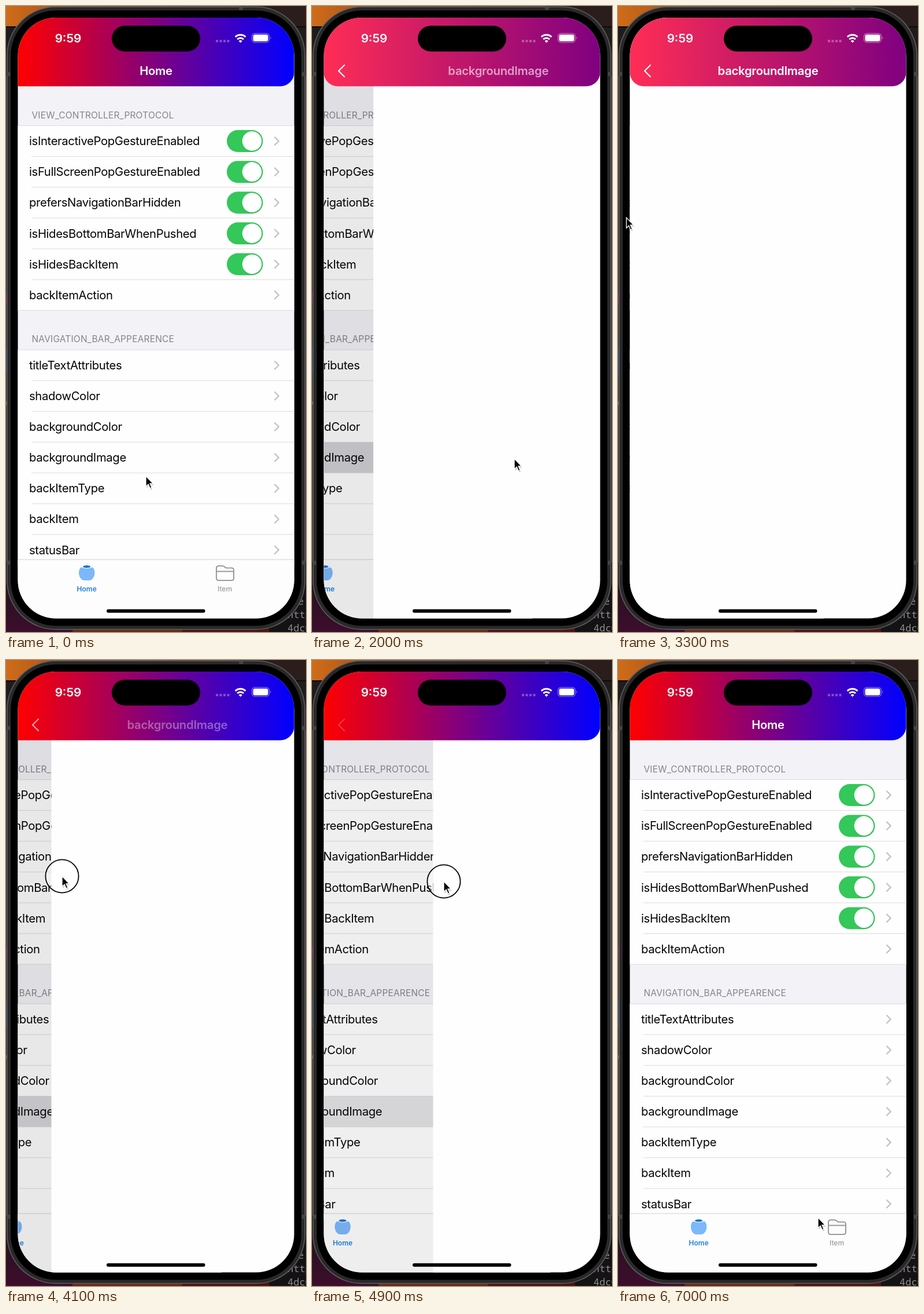
An HTML page for the animation above (7.1 s loop, 519 by 1080 pixels).

```html
<!DOCTYPE html>
<html lang="en">
<head>
<meta charset="utf-8">
<title>Navigation bar demo</title>
<style>
  html, body { margin: 0; width: 100%; height: 100%; overflow: hidden; background: #1c1618; }
  svg { display: block; width: 100vw; height: 100vh; }
  text { font-family: Inter, "Noto Sans", sans-serif; white-space: pre; }
  .row { font-size: 20.3px; letter-spacing: -.37px; fill: #050505; }
  .head { font-size: 15.5px; letter-spacing: .18px; fill: #85858a; }
  .title { font-size: 20.3px; letter-spacing: -.26px; font-weight: 600; fill: #fff; text-anchor: middle; }
  .clock { font-size: 20.7px; font-weight: 600; fill: #fff; text-anchor: middle; }
  .tab { font-size: 12px; font-weight: 500; text-anchor: middle; }
  .term { font: 17px "Noto Sans Mono", "DejaVu Sans Mono", monospace; fill: #8d8d8d; }
</style>
</head>
<body>
<svg viewBox="0 0 519 1080" preserveAspectRatio="none">
  <defs>
    <linearGradient id="homeFill" gradientUnits="userSpaceOnUse" x1="20" x2="498">
      <stop stop-color="#f00"/><stop offset="1" stop-color="#00f"/>
    </linearGradient>
    <linearGradient id="pageFill" gradientUnits="userSpaceOnUse" x1="20" x2="498">
      <stop stop-color="#ff2d55"/><stop offset="1" stop-color="#800080"/>
    </linearGradient>
    <linearGradient id="sky">
      <stop stop-color="#cf6c1a"/><stop offset=".3" stop-color="#a24d16"/><stop offset="1" stop-color="#6b2d12"/>
    </linearGradient>
    <linearGradient id="wall" x2="0" y2="1">
      <stop stop-color="#1b1517"/><stop offset="1" stop-color="#3d0d2d"/>
    </linearGradient>
    <clipPath id="screen"><rect x="20.5" y="20" width="478" height="1036.5" rx="66"/></clipPath>
  </defs>

  <!-- desktop behind the phone -->
  <rect width="519" height="1080" fill="#3b3537"/>
  <rect width="405" height="35" fill="url(#sky)"/>
  <rect x="405" width="114" height="35" fill="#2b1d1b"/>
  <rect y="35" width="519" height="2" fill="#0d0b0c"/>
  <rect y="37" width="60" height="84" fill="#201b1d"/>
  <rect x="459" y="37" width="60" height="84" fill="#201b1d"/>
  <rect y="960" width="115" height="120" fill="url(#wall)"/>
  <rect x="115" y="1070" width="190" height="10" fill="#6b2a17"/>
  <rect x="305" y="1070" width="150" height="10" fill="#4d1513"/>
  <rect x="455" y="960" width="64" height="120" fill="#141214"/>
  <rect y="495" width="1.5" height="20" fill="#84214e"/>
  <rect y="588" width="1.5" height="46" fill="#23497c"/>
  <rect y="682" width="1.5" height="6" fill="#7f762c"/>
  <text class="term" x="505" y="1033">e</text>
  <text class="term" x="487" y="1056">http</text>
  <text class="term" x="487" y="1079">4dc0</text>

  <!-- phone body -->
  <rect x="2" y="1.5" width="515" height="1074" rx="84" fill="#29292a" stroke="#5f5f61" stroke-width="1.5"/>
  <rect x="7.5" y="7" width="504" height="1063" rx="79" stroke="#2f2f31"/>
  <path d="M2 114h5v7h-5zM512 114h5v7h-5zM2 957h5v7h-5zM512 957h5v7h-5zM403 2h7v5h-7z" fill="#454546"/>

  <g clip-path="url(#screen)">
    <g id="home"></g>
    <rect id="dim" x="20" y="20" width="479" height="1037"/>
    <rect id="page" x="20.5" y="20" width="479" height="1037" fill="#fefefe"/>
    <path id="bar"/>
    <text id="homeTitle" class="title" x="259.5" y="119">Home</text>
    <text id="pageTitle" class="title" x="259.5" y="119">backgroundImage</text>
    <path id="back" d="M56 102L46 112L56 122" fill="none" stroke="#fff" stroke-width="2.1" stroke-linecap="round" stroke-linejoin="round"/>
  </g>

  <!-- status bar -->
  <rect x="183" y="34" width="153" height="44.5" rx="22.25"/>
  <text class="clock" x="107.5" y="63">9:59</text>
  <path d="M363 58.5h4v4h-4zM369.5 58.5h4v4h-4zM376 58.5h4v4h-4zM382.5 58.5h4v4h-4z" fill="#fff" opacity=".32"/>
  <g fill="none" stroke="#fff" stroke-width="2.9">
    <path d="M396.8 53.4a12.6 12.6 0 0 1 17.6 0"/>
    <path d="M400.2 57.4a7.8 7.8 0 0 1 10.8 0"/>
  </g>
  <path d="M405.6 63.4l-3-3a4.3 4.3 0 0 1 6 0z" fill="#fff"/>
  <rect x="425.5" y="47.3" width="30" height="15.6" rx="5" fill="none" stroke="#fff" stroke-opacity=".45" stroke-width="1.2"/>
  <rect x="427.5" y="49.3" width="26" height="11.6" rx="3.2" fill="#fff"/>
  <path d="M457.3 52.6q2.2 2.5 0 5z" fill="#fff" opacity=".5"/>
  <rect x="174" y="1040.7" width="170.5" height="6" rx="3"/>

  <!-- pointer -->
  <g id="pointer">
    <circle id="touch" r="28.6" fill="#fff" fill-opacity=".35" stroke="#000" stroke-width="1.8"/>
    <path d="M1.2 2.5V20.5L5.4 16.7L8.4 23.5L11.2 22.3L8.2 15.5H13.8Z" opacity=".22"/>
    <path d="M0 0V18L4.2 14.2L7.2 21L10 19.8L7 13H12.6Z" stroke="#fff" stroke-width="1.3"/>
  </g>
</svg>
<script>
const LOOP = 7100, STEP = 100, WIDTH = 478, ROW = 53.1;
const PUSH = 1750, DOWN = 3600, DRAG = 3700, RELEASE = 5200, SETTLE = 250;
const GRAB_X = 39;

const $ = id => document.getElementById(id);
const clamp = v => Math.max(0, Math.min(1, v));
const rect = (x, y, w, h, fill, extra = '') =>
  `<rect x="${x}" y="${y}" width="${w}" height="${h}" fill="${fill}" ${extra}/>`;
const line = (x, y) => rect(x, y - .5, 499 - x, 1, '#dcdcde');

function toggle(y) {
  return rect(382, y - 19, 62.5, 38, '#34c759', 'rx="19"') +
    `<circle cx="425.5" cy="${y + 1}" r="17" fill="#000" opacity=".1"/>` +
    `<circle cx="425.5" cy="${y}" r="16.8" fill="#fff"/>`;
}

function section(header, top, names, toggles) {
  let out = `<text class="head" x="44.5" y="${top - 13}">${header}</text>` +
    rect(20, top, 479, names.length * ROW, '#fefefe');
  names.forEach((name, i) => {
    const y = top + ROW * i, mid = y + ROW / 2;
    if (name === 'backgroundImage') out += rect(20, y, 479, ROW, '#d1d1d6', 'id="picked"');
    out += line(i ? 44 : 20, y) +
      `<text class="row" x="40" y="${mid + 7.2}">${name}</text>` +
      `<path d="M465 ${mid - 6.6}l6.8 6.6l-6.8 6.6" fill="none" stroke="#c4c4c7" stroke-width="2.3" stroke-linecap="round" stroke-linejoin="round"/>`;
    if (i < toggles) out += toggle(mid);
  });
  return out + line(20, top + ROW * names.length);
}

const tabs = rect(20, 955, 479, 102, '#fdfdfd') + rect(20, 954.5, 479, 1, '#d2d2d4') + `
  <path d="M130 968.3C125 972 125 981 128.5 986.5Q131.5 991 136 991H143.5Q148 991 151 986.5C154.5 981 154.5 972 149.5 968.3Q140 973 130 968.3Z" fill="#7db7fb"/>
  <ellipse cx="139.7" cy="967.3" rx="6.7" ry="2.2" fill="#1677d8"/>
  <text class="tab" x="139.7" y="1010" fill="#1f7fdb" style="font-weight:600">Home</text>
  <path d="M364 970q0-4 4-4h6.5q2 0 3.3 1.3l1.2 1.2q1 1 3 1h8q4 0 4 4v13.5q0 4-4 4h-22q-4 0-4-4zM364 975.5h30" fill="none" stroke="#9b9b9e" stroke-width="2.1"/>
  <text class="tab" x="378.5" y="1010" fill="#9b9b9e">Item</text>`;

$('home').innerHTML = rect(20, 20, 479, 1037, '#f2f2f7') +
  section('VIEW_CONTROLLER_PROTOCOL', 206.5, ['isInteractivePopGestureEnabled',
    'isFullScreenPopGestureEnabled', 'prefersNavigationBarHidden',
    'isHidesBottomBarWhenPushed', 'isHidesBackItem', 'backItemAction'], 5) +
  section('NAVIGATION_BAR_APPEARENCE', 593.2, ['titleTextAttributes', 'shadowColor',
    'backgroundColor', 'backgroundImage', 'backItemType', 'backItem', 'statusBar'], 0) + tabs;

// time, x, y
const path = [
  [0, 242, 811], [500, 242, 811], [1400, 350, 781], [2300, 350, 781],
  [3200, 14.5, 365], [3400, 14.5, 365], [DOWN, 25, 368], [4100, 97, 373],
  [4900, 228, 382], [RELEASE, 340, 392], [5500, 353, 394], [5800, 353, 394],
  [6800, 346, 962], [LOOP, 346, 962]
];

function pointerAt(t) {
  const i = path.findIndex(k => k[0] > t);
  const [a, b] = [path[i - 1], path[i]];
  let s = (t - a[0]) / (b[0] - a[0]);
  if (t < DOWN || t >= RELEASE) s = s * s * (3 - 2 * s);
  return [a[1] + (b[1] - a[1]) * s, a[2] + (b[2] - a[2]) * s];
}

// Share of the width by which the detail page is slid to the right.
function slideAt(t, x) {
  if (t < PUSH) return 1;
  if (t < DRAG) {
    const k = (t - PUSH) * .01256;
    return t > 2500 ? 0 : (1 + k) * Math.exp(-k);
  }
  const dragged = v => clamp((v - GRAB_X) / WIDTH);
  if (t < RELEASE) return dragged(x);
  const from = dragged(pointerAt(RELEASE)[0]), s = clamp((t - RELEASE) / SETTLE);
  return from + (1 - from) * (1 - (1 - s) ** 2);
}

const shift = (id, x) => $(id).setAttribute('transform', `translate(${x} 0)`);
const fade = (id, v) => $(id).setAttribute('opacity', clamp(v));

function draw(t) {
  const [x, y] = pointerAt(t);
  const p = slideAt(t, x);
  const pushed = t >= PUSH && t < DRAG;

  shift('home', -.3 * WIDTH * (1 - p));
  fade('dim', .1 * (1 - p));
  shift('page', WIDTH * p);
  fade('picked', t < 1700 ? 0 : t < DRAG ? 1 : 1 - p);

  $('bar').setAttribute('d', 'M20 20H498.5V114.5a24 24 0 0 1-24 24' +
    (pushed ? 'H44.5a24 24 0 0 1-24-24Z' : 'H20Z'));
  $('bar').setAttribute('fill', pushed ? 'url(#pageFill)' : 'url(#homeFill)');

  shift('homeTitle', -110 * (1 - p));
  fade('homeTitle', 2 * p - 1);
  shift('pageTitle', (pushed ? 350 : 304) * p);
  fade('pageTitle', 1 - (pushed ? 2.2 : 5.2) * p);
  fade('back', pushed ? 2 - 2 * p : .85 - 1.6 * p);

  $('pointer').setAttribute('transform', `translate(${x} ${y})`);
  fade('touch', (t >= 1600 && t < 1700) || (t >= DOWN && t < RELEASE) ? 1 : 0);
}

const start = performance.now();
function tick() {
  const t = (performance.now() - start) % LOOP;
  draw(Math.floor(t / STEP) * STEP);
  requestAnimationFrame(tick);
}
tick();
</script>
</body>
</html>
```
